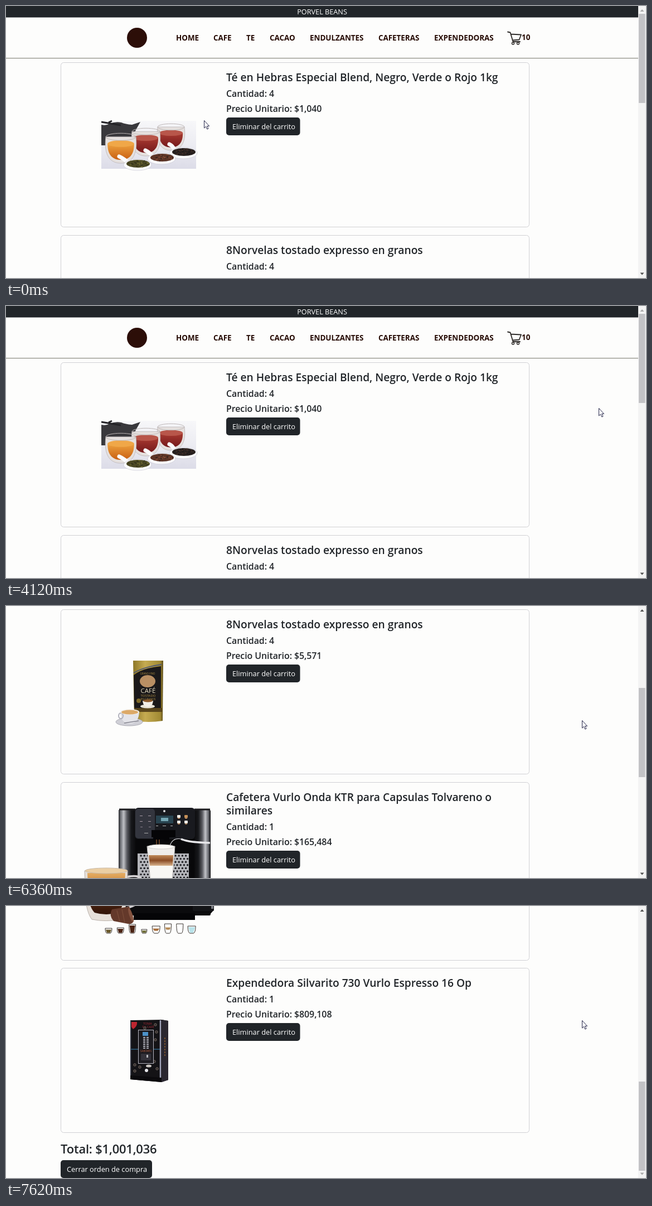
These frames come from a looping animation (1148x488 px, 8 s). An HTML page:

```html
<!DOCTYPE html>
<html lang="es">
<head>
<meta charset="utf-8">
<title>Carrito</title>
<style>
html, body { margin: 0; width: 100%; height: 100%; overflow: hidden; background: #fdfdfc; }
svg { display: block; width: 1148px; height: 488px; }
text { font-family: "Open Sans", "Noto Sans", sans-serif; fill: #212529; white-space: pre; }
.bar { font-size: 12.7px; fill: #fff; text-anchor: middle; }
.nav { font-size: 13.4px; font-weight: 700; fill: #260b04; }
.h3 { font-size: 21.9px; font-weight: 600; letter-spacing: -.007em; }
.h4 { font-size: 19.2px; font-weight: 600; }
.h5 { font-size: 15.9px; font-weight: 600; letter-spacing: -.003em; }
.btn { font-size: 12.8px; fill: #fff; }
.tiny { text-anchor: middle; }
</style>
</head>
<body>
<svg id="stage" viewBox="0 0 1148 488"></svg>
<script>
const LOOP = 8000, MAX_SCROLL = 919;

// ---- drawing helpers
const attrs = o => Object.entries(o).map(([k, v]) => ` ${k}="${v}"`).join('');
const rect = (x, y, w, h, fill, o = {}) =>
  `<rect x="${x}" y="${y}" width="${w}" height="${h}" fill="${fill}"${attrs(o)}/>`;
const oval = (cx, cy, rx, ry, fill, o = {}) =>
  `<ellipse cx="${cx}" cy="${cy}" rx="${rx}" ry="${ry}" fill="${fill}"${attrs(o)}/>`;
const path = (d, fill, o = {}) => `<path d="${d}" fill="${fill}"${attrs(o)}/>`;
const line = (d, stroke, width = 1, o = {}) =>
  path(d, 'none', { stroke, 'stroke-width': width, ...o });
const text = (x, y, cls, s) => `<text x="${x}" y="${y}" class="${cls}">${s}</text>`;
const tiny = (x, y, size, fill, s) =>
  `<text x="${x}" y="${y}" class="tiny" style="font-size:${size}px;fill:${fill}">${s}</text>`;
const group = (dy, s) => `<g transform="translate(0 ${dy})">${s}</g>`;
const ramp = (id, stops, vertical) =>
  `<linearGradient id="${id}" x2="${vertical ? 0 : 1}" y2="${vertical ? 1 : 0}">` +
  stops.map(([at, c]) => `<stop offset="${at}" stop-color="${c}"/>`).join('') + '</linearGradient>';

// seeded specks inside an ellipse
function specks(cx, cy, rx, ry, n, colors, seed) {
  const rnd = () => (seed = (seed * 16807) % 2147483647) / 2147483647;
  let s = '';
  for (let i = 0; i < n; i++) {
    const a = rnd() * 6.283, r = Math.sqrt(rnd());
    s += oval((cx + Math.cos(a) * r * rx).toFixed(1), (cy + Math.sin(a) * r * ry).toFixed(1),
      1.5, .8, colors[i % colors.length]);
  }
  return s;
}

const button = (x, y, w, label) =>
  rect(x, y, w, 32, '#212529', { rx: 5 }) + text(x + 11, y + 21, 'btn', label);

function card(i, lines, qty, price) {
  const y = Math.round(101 + i * 309.8), extra = (lines.length - 1) * 24;
  return rect(98.5, y + .5, 840, 295, 'none', { rx: 5, stroke: '#d0d0d4' }) +
    lines.map((s, n) => text(395, y + 34 + n * 24, 'h4', s)).join('') +
    text(395, y + 62 + extra, 'h5', 'Cantidad: ' + qty) +
    text(395, y + 89 + extra, 'h5', 'Precio Unitario: $' + price) +
    button(395, y + 99 + extra, 132.5, 'Eliminar del carrito');
}

// ---- pictures
function teaGlass(cx, cy, r, tea) {
  return path(`M${cx - r} ${cy - r * .75}C${cx - r * 1.15} ${cy + r * .5} ${cx - r * .7} ${cy + r} ${cx} ${cy + r}` +
      `S${cx + r * 1.15} ${cy + r * .5} ${cx + r} ${cy - r * .75}Z`, '#e6e1df', { stroke: '#b9b3b4', 'stroke-width': .8 }) +
    path(`M${cx - r * .88} ${cy - r * .3}C${cx - r * .9} ${cy + r * .5} ${cx - r * .5} ${cy + r * .78} ${cx} ${cy + r * .78}` +
      `S${cx + r * .9} ${cy + r * .5} ${cx + r * .88} ${cy - r * .3}Z`, `url(#${tea})`) +
    oval(cx, cy - r * .3, r * .88, r * .22, tea === 'amber' ? '#f0a748' : '#b8564a') +
    oval(cx, cy - r * .75, r, r * .24, 'none', { stroke: '#bdb6b6', 'stroke-width': 1 });
}
const spoon = (x, y, cx, cy, colors, seed) =>
  line(`M${x} ${y}Q${x + 7} ${y + 3} ${cx - 14} ${cy}`, '#fbfbfd', 7, { 'stroke-linecap': 'round' }) +
  oval(cx, cy + 2, 25, 10, '#fbfbfd', { stroke: '#c9c7d3', 'stroke-width': .7 }) +
  oval(cx + 1, cy, 21, 7, colors[0]) + specks(cx + 1, cy, 20, 6.5, 45, colors, seed);

const tea = () =>
  rect(171, 206, 170, 86, 'url(#mist)') +
  path('M171 213Q180 215 186 211Q196 207 207 209Q214 212 226 213L241 208L232 224L228 250H171Z', '#39383c') +
  path('M171 208L206 214M184 209L190 206', 'none', { stroke: '#242327', 'stroke-width': 3 }) +
  teaGlass(296, 235, 24, 'red') + teaGlass(251, 244, 25, 'red') + teaGlass(206, 255, 27, 'amber') +
  spoon(293, 248, 318, 262, ['#2a2220', '#4d342c', '#181516'], 7) +
  spoon(250, 259, 279, 272, ['#5d3426', '#89503a', '#34211c'], 19) +
  spoon(203, 270, 236, 283, ['#4b4824', '#777138', '#2d2b1a'], 41);

const bag = () =>
  path('M228 169H282L281 277Q256 281 230 277Z', 'url(#gold)') +
  path('M229 195Q245 182 278 179V254H230Z', '#1b191a') +
  line('M229 191Q248 180 279 176', '#4d5670', 1.8) +
  tiny(254, 194, 4.4, '#b19144', 'GRANO FINO') +
  oval(254, 206, 14, 11, '#b98f63') +
  tiny(255, 227, 11.5, '#e4dcc0', 'CAFÉ') +
  tiny(255, 234, 6, '#b19144', 'TOSTADO') + tiny(255, 239.5, 4.8, '#b19144', 'EN GRANOS') +
  rect(230, 254, 50, 7, '#5a461c') +
  oval(254, 251, 13, 3.5, '#e8e3d6') + path('M245 241H264Q263 252 254.5 252T245 241Z', '#f3efe8') +
  oval(254.5, 241, 8.5, 2.4, '#8d5a2b') + oval(238, 241, 4, 4, '#7f6a28') +
  oval(221, 279, 24, 7, '#cfcfd6', { stroke: '#a0a0a9', 'stroke-width': .8 }) +
  path('M205 261Q206 282 222 282Q238 282 239 261Z', '#e4e4e9') +
  oval(206, 268, 4, 5, 'none', { stroke: '#b0b0bb', 'stroke-width': 2 }) +
  oval(222, 261, 17, 5, '#f4f1ec') + oval(222, 261.5, 15, 4, '#dca968') +
  line('M212 281L238 277', '#85858f', 1.5);

function miniCup(i) {
  const x = 184 + i * 21.3, top = [286, 285, 279, 288, 282, 278, 278, 282][i];
  const half = [6, 6, 6, 5, 7, 6, 6, 7][i], mid = (top + 295) / 2;
  const fill = ['#6b5a2c', '#4b2313', '#4b2313', '#71703a', '#a86c38', '#b58a55', '#fff', '#b9e3ea'][i];
  return path(`M${x - half} ${top}H${x + half}Q${x + half} 294 ${x + 3} 295H${x - 3}Q${x - half} 294 ${x - half} ${top}Z`,
      '#fdfdfc', { stroke: '#3a3430', 'stroke-width': 1 }) +
    path(`M${x - half + 1} ${i < 1 || i > 3 && i < 6 ? mid - 2 : top + 2}H${x + half - 1}L${x + 3} ${i > 3 && i < 6 ? mid + 2 : 294}H${x - 3}Z`, fill);
}

function machine() {
  let holes = '';
  for (let r = 0; r < 9; r++)
    for (let c = 0; c < 14; c++)
      holes += oval(242 + c * 6.2 + (r % 2) * 3, 180 + r * 5.6, 1.7, 1.7, '#1c1c20');
  let icons = '';
  for (let i = 0; i < 4; i++) {
    const x = 310 + (i % 2) * 13, y = 107 + (i >> 1) * 10;
    icons += rect(x - 3, y, 6, 5, i === 1 ? '#c79159' : '#f2efe8', { rx: 1 }) +
      rect(x - 2, y + 5, 4, 2, '#9a7350') +
      rect(240 + (i % 2) * 15, y + 1, 5, 1, '#a79aa5') + rect(241 + (i % 2) * 15, y + 11, 4, 1, '#89808d');
  }
  return rect(202, 98, 165, 165, '#0c0c0e', { rx: 2 }) +
    rect(202, 98, 30, 125, 'url(#steel)') +
    rect(338, 98, 28, 125, 'url(#steel)', { transform: 'rotate(180 352 160.5)' }) +
    line('M203 97H232M338 97H366', '#1a1a1d', 3) +
    rect(232, 148, 106, 74, '#08080a') +
    rect(236, 176, 92, 54, '#b4b5ba') + holes +
    rect(231, 94, 108, 56, '#191a1f', { rx: 6 }) + rect(232, 96, 35, 53, '#33353e', { rx: 5 }) +
    rect(269, 108, 31, 14, '#28434f') + rect(278, 112, 13, 6, '#75a6b3') + oval(284, 100, 2, 2, '#dedee2') + icons +
    rect(248, 139, 7, 1, '#aaa') + rect(269, 126, 4, 1, '#bbb') + rect(281, 126, 6, 1, '#bbb') + rect(295, 126, 4, 1, '#bbb') +
    path('M261 134H304V147H293V154H283V150H277V158H264V147H261Z', '#050507') +
    line('M270 151V164M275 151V164', '#8c5930', 1.3) +
    line('M314 150Q318 152 328 154T366 157', '#e7e7ea', 3.5) + line('M314 150Q299 147 294 162', '#d5d5d9', 1.2) +
    path('M217 223H373V253L365 262H339V270H229V262L217 260Z', '#0b0b0d') +
    rect(247, 231, 93, 3, '#3b3c42') + rect(335, 221, 38, 34, '#141518', { rx: 2 }) +
    rect(368, 223, 4, 28, '#76787f') + rect(229, 259, 110, 12, '#050507') +
    line('M232 222H372', '#5c5e66', 1.2) +
    path('M253 163H303L298 228Q278 234 259 228Z', '#efedeb', { stroke: '#b9b7b6', 'stroke-width': 1 }) +
    path('M256 179H300L299 198H258Z', 'url(#latte)') + path('M258 198H299L296 227Q278 231 261 227Z', '#f8f7f4') +
    oval(278, 164, 24, 4, '#fbfaf7', { stroke: '#c5c2be', 'stroke-width': .8 }) +
    path('M213 219Q246 211 244 230Q242 244 208 252', 'none', { stroke: '#d5d2d4', 'stroke-width': 4 }) +
    path('M141 207Q142 255 154 270Q179 275 205 270Q218 253 218 207Z', '#e7e0d9', { stroke: '#b9b1aa', 'stroke-width': 1 }) +
    path('M146 211H214Q213 246 201 258Q180 264 159 258Q147 246 146 211Z', 'url(#brew)') +
    oval(180, 207, 38, 5, '#ebcfa4', { stroke: '#c9b9a6', 'stroke-width': 1 }) +
    tiny(181, 242, 12.5, '#b67b3d', 'miel &amp; té') +
    path('M190 252L221 247L229 273Q227 279 219 278L193 273Q184 263 190 252Z', '#64392a') +
    line('M199 254L204 274M208 252L213 276', '#7a4d3a', 1.2) +
    oval(224, 262, 3, 13, '#84533f', { transform: 'rotate(-18 224 262)' }) +
    Array.from({ length: 8 }, (_, i) => miniCup(i)).join('');
}

function vending() {
  let keys = '', dots = '';
  for (let i = 0; i < 14; i++)
    keys += rect(246 + (i % 2) * 6, 235 + (i >> 1) * 3.2, 4, 1.6, '#c9c9d2');
  for (const [x, y] of [[249, 219], [268, 213], [270, 226], [268, 240], [231, 285], [231, 296], [266, 279], [271, 292], [240, 289]])
    dots += oval(x, y, 2.2, 2.2, '#2b2525', { stroke: '#8e8078', 'stroke-width': .8 });
  return path('M223 205L279 204L291 206V312L279 316L223 311Z', '#141316') +
    path('M279 204L291 206V312L279 316Z', '#2a2730') + line('M277 205V312', '#a4a7bd', 2.5) +
    line('M224 206V308', '#3c4355', 1.2) +
    path('M225 208H235Q236 216 228 221L225 217Z', '#bd2530') +
    tiny(254, 213, 5.5, '#a92835', 'TOMA') + tiny(255, 219, 5.5, '#a92835', 'TU CAFÉ') +
    dots + rect(237.5, 222.5, 27, 60, '#1c1b20', { stroke: '#b6b6c0' }) +
    rect(245, 226, 10, 7, '#4c91c9') + keys +
    tiny(251, 262, 4.6, '#c0603c', 'SABORES') +
    rect(242, 265, 18, 12, '#34323a') + rect(252, 267, 3, 5, '#b7b7ba') +
    line('M224 257H237M265 257H276', '#3b87b8', 1.2) +
    oval(256, 287, 5, 2.5, '#c9c5c0') + oval(252, 295, 3, 3, '#e8e8ec') +
    line('M285 236V270', '#76502f', 2, { 'stroke-dasharray': '3 2' }) +
    path('M223 304L279 308V316L223 311Z', '#0b0a0d');
}

const cart = () =>
  line('M900 46.5L904.5 47.5L909.5 64H922M905.5 50.5L924 51.5L920.5 60.5L908.5 61.5', '#2d2a28', 1.8,
    { 'stroke-linejoin': 'round', 'stroke-linecap': 'round' }) +
  oval(909.5, 67, 2, 2, '#fdfdfc', { stroke: '#2d2a28', 'stroke-width': 1.5 }) +
  oval(918.5, 67, 2, 2, '#fdfdfc', { stroke: '#2d2a28', 'stroke-width': 1.5 });

// ---- page
const menu = [[305, 'HOME'], [372, 'CAFE'], [431, 'TE'], [473, 'CACAO'], [545, 'ENDULZANTES'],
  [668, 'CAFETERAS'], [768, 'EXPENDEDORAS']];

const header = rect(0, 0, 1134, 20.5, '#212529') + text(567, 15, 'bar', 'PORVEL BEANS') +
  oval(235, 57, 18, 18, '#2c0e08') + menu.map(([x, s]) => text(x, 62, 'nav', s)).join('') +
  cart() + text(925, 60.5, 'nav', '10') + rect(0, 93, 1134, 1.2, '#88887f');

const page = header + tea() + group(334, bag()) + group(673, machine()) + group(919, vending()) +
  rect(109, 102, 294.5, 294.5, 'rgba(7,120,250,.8)', { id: 'selection' }) +
  card(0, ['Té en Hebras Especial Blend, Negro, Verde o Rojo 1kg'], 4, '1,040') +
  card(1, ['8Norvelas tostado expresso en granos'], 4, '5,571') +
  card(2, ['Cafetera Vurlo Onda KTR para Capsulas Tolvareno o', 'similares'], 1, '165,484') +
  card(3, ['Expendedora Silvarito 730 Vurlo Espresso 16 Op'], 1, '809,108') +
  text(98, 1363, 'h3', 'Total: $1,001,036') + button(98, 1375, 164, 'Cerrar orden de compra');

const stage = document.getElementById('stage');
stage.innerHTML = '<defs>' +
  ramp('mist', [[0, '#f7f7f9'], [.5, '#ececf2'], [1, '#dcdce8']], true) +
  ramp('amber', [[0, '#eda23f'], [1, '#c95f12']], true) +
  ramp('red', [[0, '#a83a31'], [1, '#74191b']], true) +
  ramp('gold', [[0, '#8d7727'], [.4, '#c5ab51'], [.9, '#a18a34'], [1, '#5d4d1a']]) +
  ramp('steel', [[0, '#2a2b2f'], [.12, '#6d6f75'], [.3, '#c0c1c6'], [.5, '#5a5b61'], [.75, '#17181b'], [1, '#0c0c0e']]) +
  ramp('latte', [[0, '#c08a5a'], [.5, '#8a4c25'], [1, '#d9b48e']], true) +
  ramp('brew', [[0, '#e5ad62'], [.33, '#cf8b42'], [.42, '#4e2512'], [1, '#331508']], true) +
  '</defs>' + rect(0, 0, 1148, 488, '#fdfdfc') + `<g id="page">${page}</g>` +
  rect(1134, 0, 14, 488, '#f3f3f3') + rect(1135, 14, 11.5, 160, '#c2c2c5', { id: 'thumb' }) +
  path('M1137.5 10L1141 6L1144.5 10Z', '#505050', { id: 'up' }) +
  path('M1137.5 478.5L1141 482.5L1144.5 478.5Z', '#505050', { id: 'down' }) +
  path('M.5 .5V14L3.5 11.2L5.8 16L8 15L5.7 10.4H9.6Z', '#fff',
    { id: 'cursor', stroke: '#25264a', 'stroke-width': 1, 'stroke-linejoin': 'round' });

const [pageEl, selection, thumb, up, down, cursor] =
  ['page', 'selection', 'thumb', 'up', 'down', 'cursor'].map(id => document.getElementById(id));

const spans = [[0], [500], [780], [940, 1080, 3], [1320, 1920, 8], [2200, 2580, 5], [2720], [2860],
  [3000, 3460, 7], [3700, 3860, 3], [4120], [4300, 4720, 6], [4980], [5120, 5240, 2], [5380, 5660, 4],
  [5800, 5840, 2], [5980, 6220, 3], [6360, 6640, 4], [6940], [7100], [7240, 7360, 2], [7500, 7620, 2]];
const ticks = spans.flatMap(([a, b = a, n = 1]) =>
  Array.from({ length: n }, (_, i) => n > 1 ? a + (b - a) * i / (n - 1) : a));

const pointer = [[0, 355, 206], [500, 250, 204], [780, 62, 198], [940, 32, 196], [1080, 45, 198], [1320, 70, 194],
  [1740, 76, 192], [1840, 76, 192], [1920, 68, 193], [2200, 40, 190], [2580, 300, 186], [3000, 600, 190],
  [3460, 860, 194], [3860, 1010, 189], [4120, 1063, 184], [4720, 1045, 200], [4980, 1033, 206]];
const scrolling = [[0, 0], [4720, 0], [4980, 2], [5120, 7], [5240, 15], [5380, 62], [5660, 285], [5800, 334],
  [5840, 342], [5980, 352], [6220, 359], [6360, 405], [6540, 610], [6640, 673], [6940, 679], [7100, 683],
  [7240, 725], [7500, 875], [7620, MAX_SCROLL]];

function track(keys, t) {
  const n = keys.findIndex(k => k[0] > t);
  if (n < 0) return keys[keys.length - 1].slice(1);
  const a = keys[n - 1], b = keys[n], p = (t - a[0]) / (b[0] - a[0]);
  return a.slice(1).map((v, i) => Math.round(v + (b[i + 1] - v) * p));
}

function render(ms) {
  const t = ticks.filter(k => k <= ms).pop();
  const [y] = track(scrolling, t), [cx, cy] = track(pointer, t);
  pageEl.setAttribute('transform', `translate(0 ${-y})`);
  thumb.setAttribute('y', Math.round(14 + y * 301 / MAX_SCROLL));
  up.setAttribute('fill', y > 0 ? '#505050' : '#a9a9a9');
  down.setAttribute('fill', y < MAX_SCROLL ? '#505050' : '#a9a9a9');
  selection.setAttribute('visibility', t >= 780 && t < 4120 ? 'visible' : 'hidden');
  cursor.setAttribute('transform', `translate(${cx} ${cy - 1})`);
}

const start = performance.now();
function frame() {
  render((performance.now() - start) % LOOP);
  requestAnimationFrame(frame);
}
frame();
</script>
</body>
</html>
```
